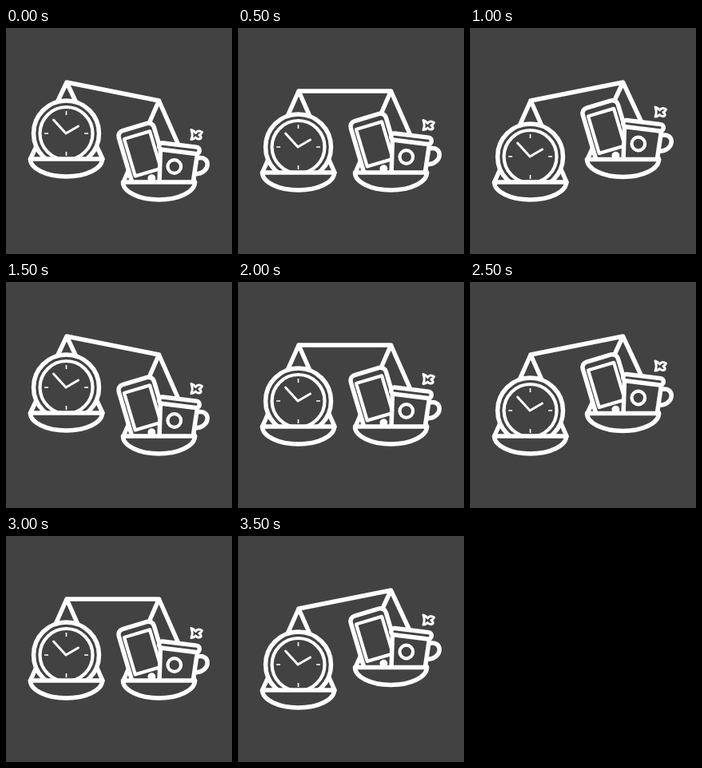
An HTML page for the animation above (4 s loop, 283x283 px).

```html
<!DOCTYPE html>
<html lang="en">
<head>
<meta charset="utf-8">
<title>Balance</title>
<style>
html, body { margin: 0; width: 100%; height: 100%; overflow: hidden; background: #424242; }
svg { display: block; width: 100vw; height: 100vh; }
.line { fill: none; stroke: #fff; stroke-width: 5.5; stroke-linejoin: round; stroke-linecap: round; }
.solid { fill: #424242; }
.mid { stroke-width: 4.2; }
.hand { stroke-width: 3; }
.thin { stroke-width: 1.6; stroke-linecap: butt; }
.pose { visibility: hidden; animation: 4s step-end infinite; }
.up { animation-name: up; }
.level { animation-name: level; }
.down { animation-name: down; }
@keyframes up {
  0%, 37.5% { visibility: visible; }
  12.5%, 50%, 100% { visibility: hidden; }
}
@keyframes level {
  0%, 25%, 62.5%, 87.5%, 100% { visibility: hidden; }
  12.5%, 50%, 75% { visibility: visible; }
}
@keyframes down {
  0%, 37.5%, 75%, 100% { visibility: hidden; }
  25%, 62.5%, 87.5% { visibility: visible; }
}
</style>
</head>
<body>
<svg viewBox="0 0 283 283">
  <defs>
    <!-- Both loads are drawn with the pan rim at y = 0 -->
    <path id="pan" class="solid" d="M-45 0H45C45 12 25 22 0 22S-45 12-45 0Z"/>

    <g id="clock">
      <circle class="solid" cy="-32" r="41"/>
      <circle class="mid" cy="-32" r="33"/>
      <path class="thin" d="M0-60v5M0-9v5M-27.500-32h5M22.500-32h5"/>
      <path class="hand" d="M-16-49L-.5-32L15-41"/>
      <use href="#pan"/>
    </g>

    <g id="treats">
      <g transform="translate(-30.2 -69) rotate(-16.5)">
        <rect class="solid" x="-23" width="46" height="78" rx="7"/>
        <path class="mid" d="M-17 10.500H16.500V59H-17Z"/>
        <circle cx="2" cy="67.500" r="2.2" style="fill:#fff"/>
      </g>
      <path d="M48-30C65-34 66-11 45-10"/>
      <path class="solid" d="M2-43L.5 2H42.500L48.500-38Z"/>
      <circle class="mid" cx="19.300" cy="-19.500" r="8.300"/>
      <rect class="solid" x="-25.500" y="-4.200" width="51" height="8.400" rx="4.200" transform="translate(25.500 -42.300) rotate(7)"/>
      <path class="hand" d="M40.500-65.500Q44-64.500 46-61.500Q49-66 54-62.500Q53-60 50.500-59Q54-56 52-54.500Q48-53 46-56Q43-53 40.500-53.500Q43-59 40.500-65.500Z"/>
      <use href="#pan"/>
    </g>
  </defs>

  <g class="line">
    <g class="pose up">
      <path d="M30.500 164L76 68L121 164M76 68L191.500 91M147 193L191.500 91L236.500 193"/>
      <use href="#clock" x="75.500" y="164"/>
      <use href="#treats" x="191.500" y="193"/>
    </g>
    <g class="pose level">
      <path d="M30.500 181L76 79L121 181M76 79H191.500M147 181L191.500 79L236.500 181"/>
      <use href="#clock" x="75.500" y="181"/>
      <use href="#treats" x="191.500" y="181"/>
    </g>
    <g class="pose down">
      <path d="M30.500 193L76 91L121 193M76 91L191.500 68M147 164.500L191.500 68L236.500 164.500"/>
      <use href="#clock" x="75.500" y="193"/>
      <use href="#treats" x="191.500" y="164.500"/>
    </g>
  </g>
</svg>
</body>
</html>
```
